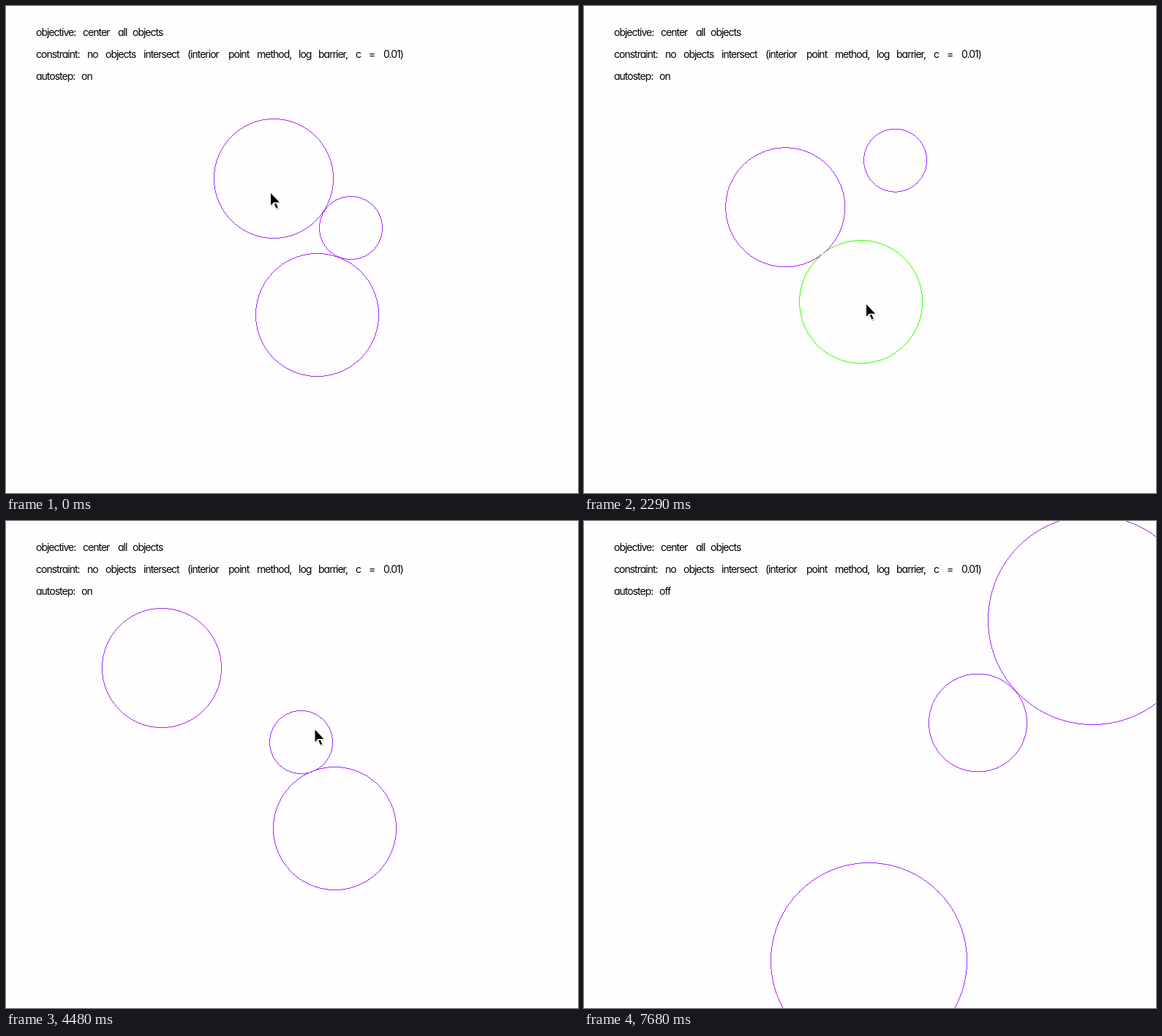
Animation of 782x666 px, one loop 8000 ms. Source, as an HTML page with a canvas:

```html
<!DOCTYPE html>
<html lang="en">
<head>
<meta charset="utf-8">
<title>Circle packing</title>
<style>
  html, body { margin: 0; width: 100%; height: 100%; overflow: hidden; background: #fefefe; }
  canvas, svg { position: absolute; left: 0; top: 0; width: 782px; height: 666px; }
  text { font: 400 14px Inter, "Open Sans", sans-serif; font-feature-settings: "cv11"; letter-spacing: -1px; fill: #000; }
</style>
</head>
<body>
<canvas id="stage" width="782" height="666"></canvas>
<svg viewBox="0 0 782 666">
  <text y="41"><tspan x="41">objective:</tspan> <tspan x="105">center</tspan> <tspan x="153">all</tspan> <tspan x="173">objects</tspan></text>
  <text y="71"><tspan x="41">constraint:</tspan> <tspan x="111">no</tspan> <tspan x="136">objects</tspan> <tspan x="188">intersect</tspan> <tspan x="248">(interior</tspan> <tspan x="304">point</tspan> <tspan x="343">method,</tspan> <tspan x="400">log</tspan> <tspan x="427">barrier,</tspan> <tspan x="478">c</tspan> <tspan x="496">=</tspan> <tspan x="516">0.01)</tspan></text>
  <text y="101"><tspan x="41">autostep:</tspan> <tspan x="103" id="mode">on</tspan></text>
  <g id="cursor">
    <g opacity=".18" transform="translate(1 2)">
      <path d="M0 0V16.5L4.2 12.6H12Z"/>
      <path d="M6 13.5L9 20.5" stroke="#000" stroke-width="4"/>
    </g>
    <path d="M5.6 13L8.8 20.6" stroke="#fff" stroke-width="5"/>
    <path d="M5.9 14.2L8.5 20" stroke="#000" stroke-width="2.6"/>
    <path d="M0 0V16.5L4.2 12.6H12Z" stroke="#fff" stroke-width="1.6" paint-order="stroke"/>
  </g>
</svg>
<script>
const LOOP = 8000, RESET = 6060, AUTO_OFF = 7400, POINTER_OUT = 5760;
const SETTLE = 240;   // time the free circles take to rearrange
const RELEASE = 180;  // time a circle stays selected after its last move
const LEAD = 60;      // the pointer runs ahead of the circle it drags
const PURPLE = '#a428ff', GREEN = '#40ff00';

const $ = id => document.getElementById(id);
const ctx = $('stage').getContext('2d');

const disc = (r, x, y) => ({ r, keys: [[0, x, y]], held: [] });
const last = item => item.keys[item.keys.length - 1].slice(1);

// Wait until t0, then glide to the new point by t1.
function move(item, t0, t1, x, y) {
  item.keys.push([t0, ...last(item)], [t1, x, y]);
}

function at(keys, t) {
  const i = keys.findIndex(k => k[0] > t);
  if (i < 1) return keys[i < 0 ? keys.length - 1 : 0].slice(1);
  const [t0, x0, y0] = keys[i - 1], [t1, x1, y1] = keys[i];
  const p = (t - t0) / (t1 - t0), e = p * p * (3 - 2 * p);
  return [x0 + (x1 - x0) * e, y0 + (y1 - y0) * e];
}

const a = disc(81.5, 365.5, 235.5), b = disc(43, 471, 303), c = disc(84, 425, 422);
const pointer = { keys: [[0, 361.5, 255.5]] };

// The pointer takes a disc at an offset and leads it through the stops,
// while the other discs settle around it.
function drag(item, [gx, gy], start, stops, others = []) {
  const [x, y] = last(item);
  pointer.keys.push([start - LEAD - 60, x + gx, y + gy]);
  let t0 = start;
  for (const [t1, x1, y1] of stops) {
    move(item, t0, t1, x1, y1);
    move(pointer, t0 - LEAD, t1 - LEAD, x1 + gx, y1 + gy);
    t0 = t1;
  }
  item.held.push([start, t0 + RELEASE]);
  pointer.keys.push([t0 + RELEASE - LEAD, ...last(pointer)]);
  for (const [other, ox, oy] of others) move(other, start, start + SETTLE, ox, oy);
}

drag(a, [-4, 20], 180, [[400, 173.5, 217.5]]);
drag(b, [-1, -35], 740, [[900, 372, 286], [1580, 409, 264], [1640, 425, 210]],
  [[a, 274.5, 274.5], [c, 378, 404]]);
drag(c, [0, 0], 2280, [[2740, 496, 459]], [[a, 313.5, 323.5], [b, 438, 313]]);
drag(a, [-17, 54], 3680, [[4100, 212.5, 200.5]], [[b, 403, 302], [c, 449, 420]]);
drag(b, [19, -17], 4590, [[4890, 479, 190]], [[a, 314.5, 275.5], [c, 436, 389]]);
pointer.keys.push([5290, 462, 285]);
move(pointer, 5360, POINTER_OUT, 784, 460);

const small = disc(67, 691, 71);
move(small, 6920, 7100, 460, 414);
move(small, 7340, 7660, 538, 275.5);
const before = [a, b, c], after = [disc(143, 695, 135), small, disc(134, 389, 601)];

// One-pixel ring without smoothing: step along each axis over the flat arcs.
function ring(cx, cy, r) {
  const span = r * Math.SQRT1_2;
  const dot = (x, y) => ctx.fillRect(Math.floor(x), Math.floor(y), 1, 1);
  for (let x = Math.floor(cx - span); x <= cx + span; x++) {
    const d = x + 0.5 - cx, h = Math.sqrt(r * r - d * d);
    dot(x, cy - h);
    dot(x, cy + h);
  }
  for (let y = Math.floor(cy - span); y <= cy + span; y++) {
    const d = y + 0.5 - cy, w = Math.sqrt(r * r - d * d);
    dot(cx - w, y);
    dot(cx + w, y);
  }
}

function draw(t) {
  ctx.clearRect(0, 0, 782, 666);
  for (const d of t < RESET ? before : after) {
    const [x, y] = at(d.keys, t);
    ctx.fillStyle = d.held.some(([from, to]) => t >= from && t < to) ? GREEN : PURPLE;
    ring(x + 0.5, y + 0.5, d.r);
  }
  const [x, y] = at(pointer.keys, t);
  $('cursor').setAttribute('transform', `translate(${x + 0.5} ${y + 0.5})`);
  $('cursor').setAttribute('visibility', t < POINTER_OUT ? 'visible' : 'hidden');
  $('mode').textContent = t < AUTO_OFF ? 'on' : 'off';
}

const begin = performance.now();
function tick(now) {
  draw(Math.max(0, now - begin) % LOOP);
  requestAnimationFrame(tick);
}
draw(0);
requestAnimationFrame(tick);
</script>
</body>
</html>
```
